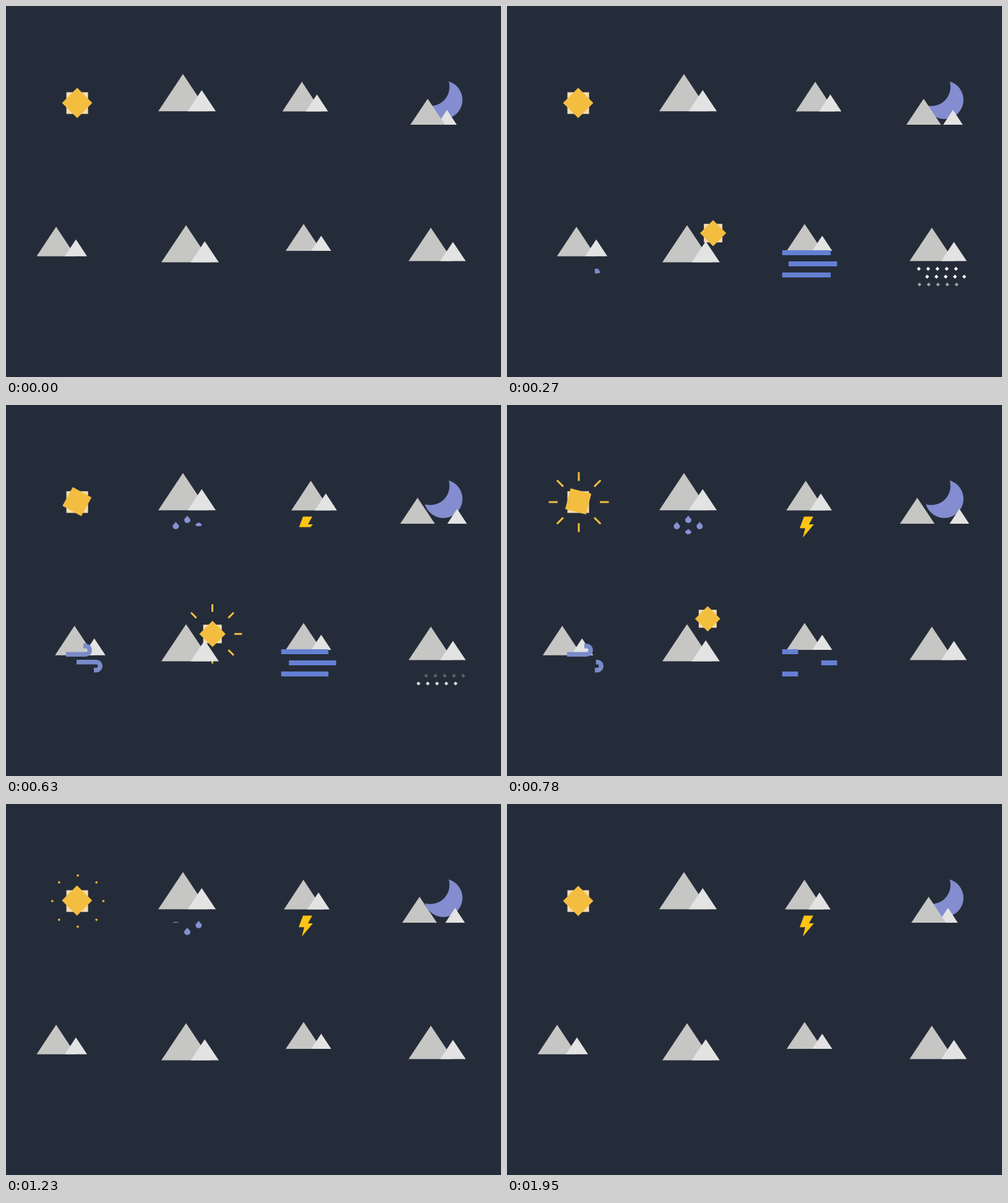
An HTML page with a canvas for the animation above (1980 ms loop, 800 by 600 pixels).

```html
<!DOCTYPE html>
<html>
<head>
<meta charset="utf-8">
<title>Mountain weather icons</title>
<style>
html, body { margin: 0; height: 100%; overflow: hidden; background: #252c39; }
canvas { display: block; }
</style>
</head>
<body>
<canvas id="stage" width="800" height="600"></canvas>
<script>
const ctx = document.getElementById('stage').getContext('2d');
const LOOP = 1980, STEP = 30;
const GOLD = '#f3be40', BIG = '#c6c6c4', SMALL = '#e3e3e3';

// Easing and timing: every tween is a 0..1 ramp over [start, start + length].
const linear = u => u;
const quadOut = u => 1 - (1 - u) ** 2;
const quadInOut = u => u < .5 ? 2 * u * u : 1 - 2 * (1 - u) ** 2;
const sineOut = u => Math.sin(u * Math.PI / 2);
const sineInOut = u => (1 - Math.cos(u * Math.PI)) / 2;
const ramp = (t, start, length, ease = quadOut) =>
  ease(Math.min(1, Math.max(0, (t - start) / length)));
const pulse = (t, on, onLen, off, offLen, ease) =>
  ramp(t, on, onLen, ease) - ramp(t, off, offLen, ease);

function poly(color, ...pts) {
  ctx.fillStyle = color;
  ctx.beginPath();
  for (let i = 0; i < pts.length; i += 2) ctx.lineTo(pts[i], pts[i + 1]);
  ctx.fill();
}

function peak(color, x, top, half, base) {
  poly(color, x, top, x + half, base, x - half, base);
}

function mountains(x, top, half, base, x2, top2, half2) {
  peak(BIG, x, top, half, base);
  peak(SMALL, x2, top2, half2, base);
}

function square(color, x, y, side, angle, ox = 0, oy = 0) {
  ctx.save();
  ctx.translate(x, y);
  ctx.rotate(angle);
  ctx.fillStyle = color;
  ctx.fillRect(ox - side / 2, oy - side / 2, side, side);
  ctx.restore();
}

// Eight strokes that grow from their midpoints.
function rays(x, y, axisMid, diagMid, half, amount) {
  if (amount <= 0) return;
  ctx.strokeStyle = GOLD;
  ctx.lineWidth = 3;
  ctx.beginPath();
  for (let i = 0; i < 8; i++) {
    const a = i * Math.PI / 4, mid = i % 2 ? diagMid : axisMid;
    for (const r of [mid - half * amount, mid + half * amount])
      ctx[r < mid ? 'moveTo' : 'lineTo'](x + r * Math.cos(a), y + r * Math.sin(a));
  }
  ctx.stroke();
}

function sun(t) {
  // Plays forward, backward, forward again, then resets.
  const turn = 945, start = 400, end = 2 * turn - start;
  let p = t < turn ? t : t < end ? 2 * turn - t : t - end + start;
  if (t >= 1950) p = 0;
  rays(116, 157, 41.3, 42.7, 7.4, ramp(p, 640, 170));
  square('#f7ddb0', 115.1, 157, 35, 0);
  const spin = Math.PI * ramp(p, start, 520, sineInOut);
  ctx.save();
  ctx.translate(115.25, 156.3);
  ctx.rotate(spin);
  square(GOLD, -.2, .45, 34.6, Math.PI / 4);
  ctx.restore();
}

function drop(x, y, scale) {
  if (scale <= 0) return;
  ctx.save();
  ctx.translate(x, y + 2);
  ctx.scale(1, scale);
  ctx.fillStyle = '#8591d3';
  ctx.beginPath();
  ctx.moveTo(0, -2);
  ctx.bezierCurveTo(1.5, 1, 5, 2.5, 5, 5.3);
  ctx.arc(0, 5.3, 5, 0, Math.PI);
  ctx.bezierCurveTo(-5, 2.5, -1.5, 1, 0, -2);
  ctx.fill();
  ctx.restore();
}

function rain(t) {
  mountains(286, 110, 40, 170.3, 316.3, 136, 22.8);
  [[293, 178.7], [274.4, 188.7], [311.4, 188.7], [293, 199.7]].forEach(([x, y], i) =>
    drop(x, y, pulse(t, 330 + 130 * i, 130, 1015 + 130 * i, 130)));
}

function storm(t) {
  const dx = -2.5 + 20.5 * ramp(t, 0, 320) - 18 * ramp(t, 570, 320);
  mountains(480.7 + dx, 122.5, 31.5, 170.4, 505 + dx, 143, 18);
  const shown = 34.5 * ramp(t, 570, 200);
  ctx.save();
  ctx.beginPath();
  ctx.rect(465, 180, 40, shown);
  ctx.clip();
  poly('#ffc414', 480, 180.5, 495, 180.5, 488, 193, 496, 193,
    478, 214.5, 482, 199.3, 473, 199.3);
  ctx.restore();
}

function night(t) {
  const dx = 19.6 * pulse(t, 0, 1000, 1025, 960, sineOut);
  ctx.fillStyle = '#838dcf';
  ctx.fill(new Path2D('M715.5 122A31 31 0 1 1 677 160.5A31 31 0 0 0 715.5 122Z'));
  peak(SMALL, 712.7 + dx, 168, 15.8, 192);
  peak(BIG, 681.5 - dx, 150, 28, 192);
}

// Strokes a path from its start, up to the given share of its length.
function trace(path, length, amount) {
  if (amount <= .005) return;
  ctx.setLineDash([length * amount, 200]);
  ctx.stroke(new Path2D(path));
  ctx.setLineDash([]);
}

function wind(t) {
  const dx = 32 * pulse(t, 0, 320, 618, 330);
  mountains(81 + dx, 357, 31.5, 404.7, 113 + dx, 377.5, 18);
  ctx.strokeStyle = '#798bc8';
  ctx.lineWidth = 7.6;
  trace('M125 389.8H128.5A6.7 6.7 0 0 1 128.5 403.2H97', 56.1, pulse(t, 362, 200, 782, 320));
  trace('M142 428.7H145.8A6.45 6.45 0 0 0 145.8 415.8H114', 55.9, pulse(t, 260, 150, 680, 310));
}

function sunrise(t) {
  const u = pulse(t, 0, 300, 690, 290, quadInOut), v = 1 - u;
  const along = (a, b, c, d) =>
    v ** 3 * a + 3 * v * v * u * b + 3 * v * u * u * c + u ** 3 * d;
  const x = along(287, 270, 325, 333.7), y = along(390, 306, 320, 370.3);
  if (u > 0) {
    const side = 30 * (.82 + .18 * u);
    rays(333.5, 370.2, 41.8, 42.7, 6.1, pulse(t, 280, 130, 650, 100));
    square('#f7ddb0', x, y, side, 0);
    square(GOLD, x, y, side, Math.PI / 4);
  }
  mountains(291, 354.5, 40, 414.6, 321.2, 380.5, 22.7);
}

function fog(t) {
  mountains(481, 352.5, 29, 396, 509.4, 371.5, 16.2);
  const w = 88.7 * pulse(t, 0, 410, 602, 385);
  ctx.fillStyle = '#6480d4';
  for (let i = 0; i < 3; i++)
    ctx.fillRect(i === 1 ? 533.5 - w : 444.8, 395 + 18 * i, w, 8);
}

function snow(t) {
  mountains(686.6, 358.5, 36, 412.5, 722.3, 381.5, 20.7);
  [665.6, 679, 666.6].forEach((x, row) => {
    ctx.globalAlpha = Math.max(0, pulse(t, 20 + 100 * row, 150, 490 + 65 * row, 150));
    for (let i = 0; i < 5; i++)
      square('#fff', x + 15 * i, 425 + 12.7 * row, 4.5, Math.PI / 4);
    ctx.globalAlpha = 1;
  });
}

const icons = [sun, rain, storm, night, wind, sunrise, fog, snow];
const begin = performance.now();

function draw() {
  const t = Math.floor((performance.now() - begin) % LOOP / STEP) * STEP;
  ctx.fillStyle = '#252c39';
  ctx.fillRect(0, 0, 800, 600);
  for (const icon of icons) icon(t);
  requestAnimationFrame(draw);
}
draw();
</script>
</body>
</html>
```
